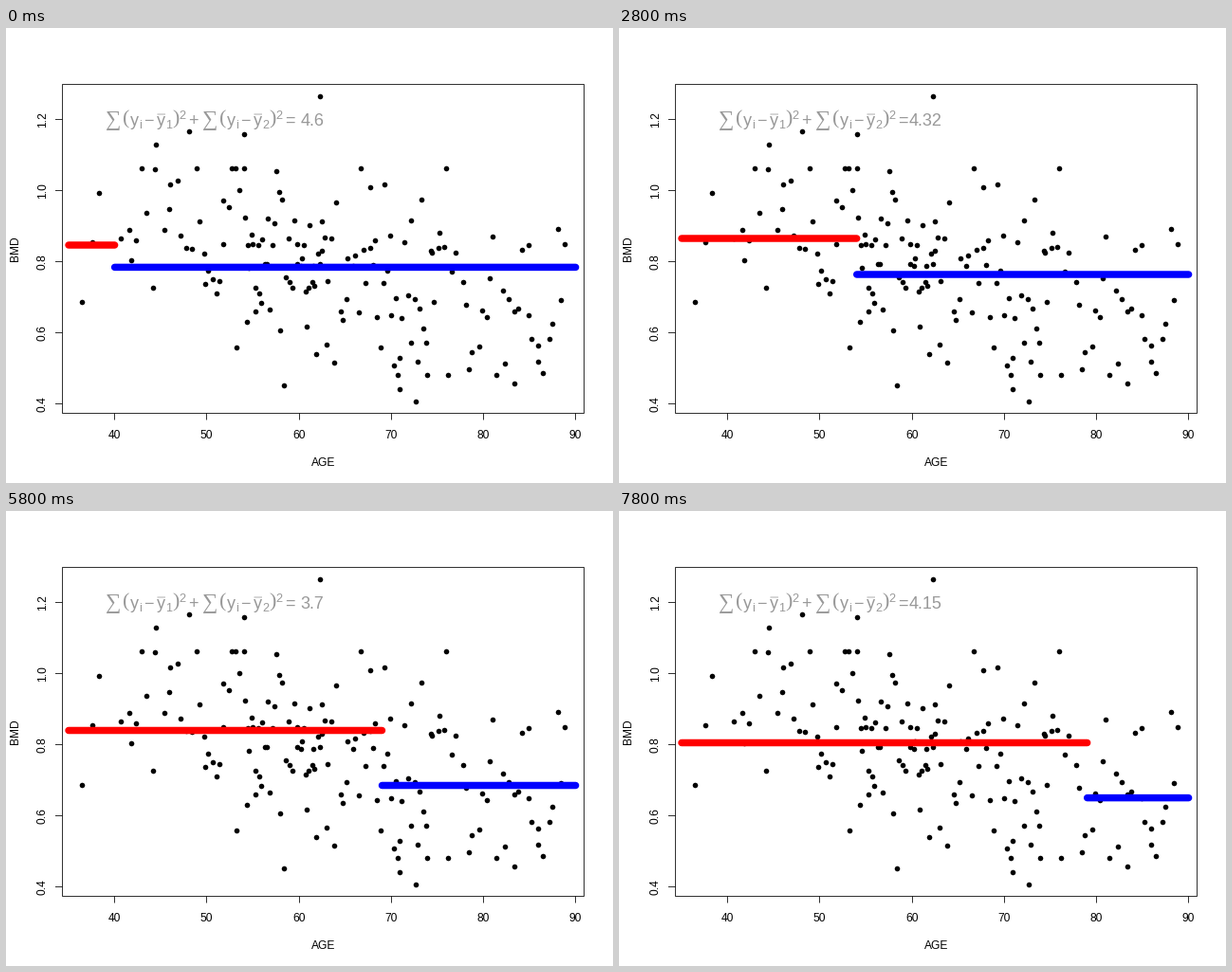
A matplotlib script that plays this animation: 640 by 480 pixels, repeating every 8000 ms.

```python
import numpy as np
import matplotlib.pyplot as plt
from matplotlib.animation import FuncAnimation
from matplotlib.patches import Rectangle

W, H, DPI = 640, 480, 100
PT = 72 / DPI                      # points per pixel
STEP_MS, FIRST, LAST = 200, 40, 79
GREY = "#999999"
SANS, SERIF = "Liberation Sans", "Liberation Serif"

# Dots that stand apart from the cloud, in pixels
OUTLIERS = np.array([
    (79.5, 288.5), (90.5, 225.5), (97.5, 173.5), (157.5, 122.5),
    (192.5, 108.5), (250.5, 112), (293, 376.5), (331, 72), (414.5, 381),
    (432, 394), (463.5, 147.5), (536, 375), (550.5, 228.5), (589, 228)])
CLOUD = 152
DECILES = [120, 200, 250, 276, 311, 336, 382, 418, 455, 520, 587]

# split age, left mean (px), right mean (px), squared error
FITS = np.array([
    (40, 229, 252.4, 4.60), (41, 216, 253, 4.56), (43, 225.5, 253.5, 4.56),
    (45, 211, 255, 4.46), (48, 206.2, 257, 4.35), (54, 222, 260, 4.32),
    (60, 229.5, 266, 4.23), (63, 230, 274.5, 4.01), (69, 231.5, 289.5, 3.70),
    (73, 238.5, 294, 3.92), (79, 244.5, 302.6, 4.15)])


def age_x(age):
    return 114.6 + (age - 40) * 9.72


def bmd_y(bmd):
    return 396.6 - (bmd - 0.4) * 375


fig = plt.figure(figsize=(W / DPI, H / DPI), dpi=DPI, facecolor="white")
ax = fig.add_axes([0, 0, 1, 1])
ax.set(xlim=(0, W), ylim=(H, 0))
ax.axis("off")


def label(x, y, s, size=12, color="black", font=SANS, ha="center", rot=0):
    return ax.text(x, y, s, fontsize=size * PT, color=color, family=font,
                   ha=ha, va="baseline", rotation=rot,
                   rotation_mode="anchor")


def line(xs, ys, color="black", width=0.8, cap="butt", z=2):
    return ax.plot(xs, ys, color=color, lw=width * PT, zorder=z,
                   solid_capstyle=cap, snap=False)[0]


def draw_axes():
    ax.add_patch(Rectangle((59.5, 59.5), 550, 347, fill=False, lw=0.8 * PT,
                           ec="black", snap=False))
    for age in range(40, 91, 10):
        x = int(age_x(age)) + 0.5
        line([x, x], [406.5, 413.5])
        label(x, 433, str(age))
    for bmd in (0.4, 0.6, 0.8, 1.0, 1.2):
        y = int(bmd_y(bmd)) + 0.5
        line([52, 59.5], [y, y])
        label(42, y, f"{bmd:.1f}", rot=90)
    label(334.4, 462, "AGE")
    label(12.5, 233, "BMD", rot=90)


def draw_dots():
    rng = np.random.default_rng(12)
    rank = (np.arange(CLOUD) + rng.uniform(0, 1, CLOUD)) / CLOUD * 10
    x = np.interp(rank, np.arange(11), DECILES)
    y = 252 + 0.24 * (x - 342) + rng.normal(0, 52, CLOUD)
    x = np.append(x, OUTLIERS[:, 0])
    y = np.append(y.clip(148, 366), OUTLIERS[:, 1])
    ax.scatter(x, y, s=(5.6 * PT) ** 2, c="black", lw=0, zorder=3)


def draw_term(x, index):
    """Sum of squared deviations from one group mean."""
    def put(dx, y, s, size=18, font=SANS):
        label(x + dx, y, s, size, GREY, font, "left")

    put(0, 102.5, "\u2211", 23, SERIF)
    put(18, 101.5, "(", 22, SERIF)
    put(26, 103, "y")
    put(35.5, 106, "i", 12.6)
    put(40, 103, "\u2212")
    put(54, 103, "y")
    line([x + 54.5, x + 63], [91, 91], GREY)
    put(63, 106, index, 12.6)
    put(70, 101.5, ")", 22, SERIF)
    put(77.5, 95.5, "2", 12.6)


draw_axes()
draw_dots()
draw_term(105, "1")
label(192, 103, "+", 18, GREY, ha="left")
draw_term(207, "2")
label(294, 103, "=", 18, GREY, ha="left")

error = label(323, 103, "", 18, GREY)
left = line([], [], "#ff0000", 7.5, "round", 5)
right = line([], [], "#0000ff", 7.5, "round", 5)


def update(i):
    split = FIRST + i
    low, high, rss = (np.interp(split, FITS[:, 0], FITS[:, c])
                      for c in (1, 2, 3))
    x = age_x(split)
    left.set_data([age_x(35), x], [low, low])
    right.set_data([x, age_x(90)], [high, high])
    error.set_text(f"{round(rss, 2):g}")
    return left, right, error


anim = FuncAnimation(fig, update, frames=LAST - FIRST + 1, interval=STEP_MS,
                     repeat=True, repeat_delay=0, blit=False)
plt.show()
```
